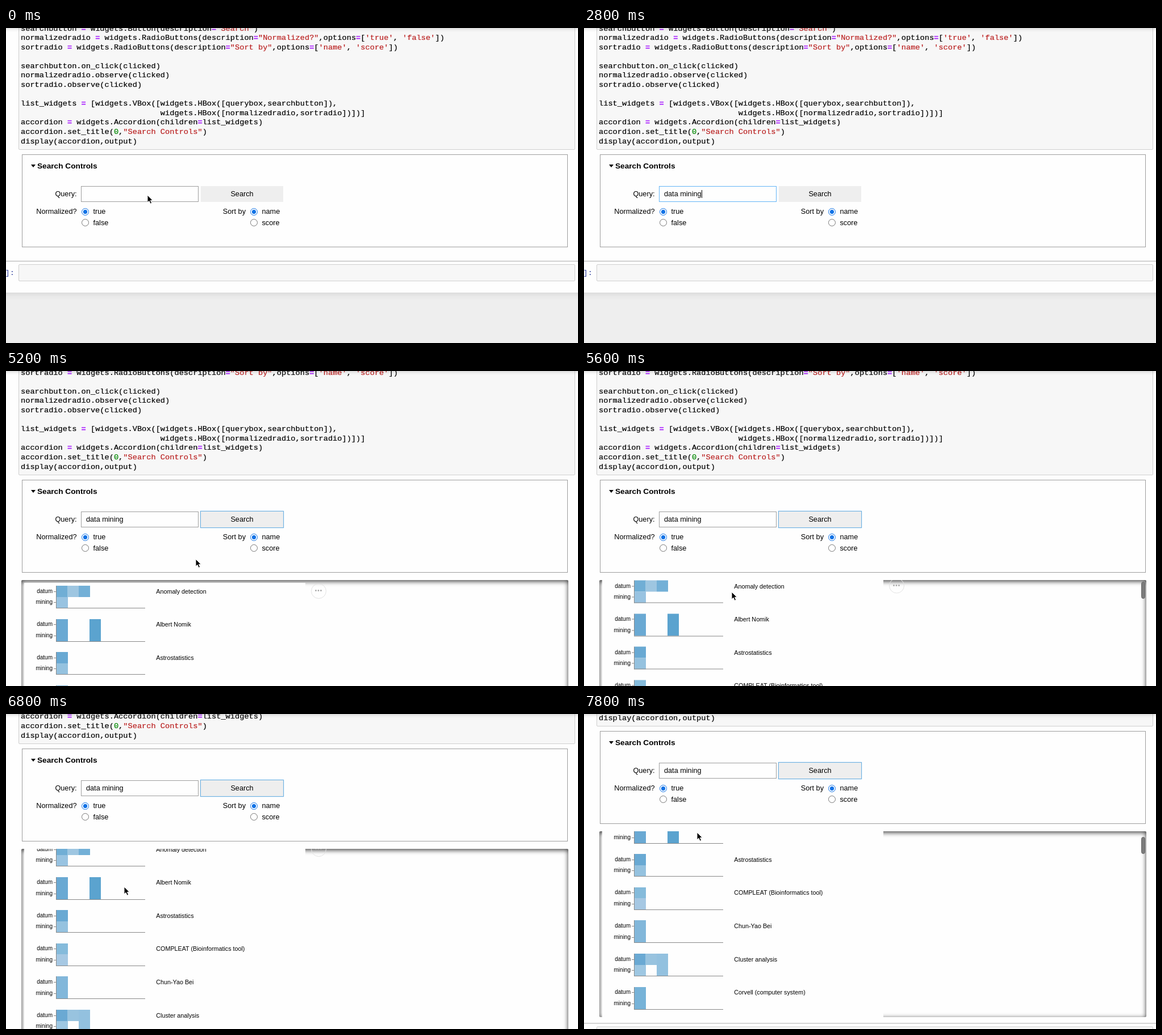
Animation, 1007 px wide and 556 px high, one loop 8 s. Source, as an HTML page:

```html
<!DOCTYPE html>
<html lang="en">
<head>
<meta charset="utf-8">
<title>Search controls</title>
<style>
  html, body { margin: 0; width: 100%; height: 100%; overflow: hidden; background: #eee; }
  body { position: relative; font: 12.7px/20px "Liberation Sans", Arial, sans-serif; color: #000; }
  div, pre, svg { position: absolute; left: 0; top: 0; box-sizing: border-box; margin: 0; white-space: pre; }
  #page, #main, #lower { width: 1007px; height: 0; }
  #paper { left: -20px; top: -20px; width: 1047px; background: #fefefe; box-shadow: 0 0 12px 1px rgba(87,87,87,.22); }
  #header { left: -20px; top: -20px; width: 1047px; height: 20px; box-shadow: 0 0 6px 1px rgba(87,87,87,.3); }
  .cell { background: #f7f7f7; border: 1px solid #cfcfcf; border-radius: 2px; }
  pre, .prompt { font: 13.67px/16.6px "Liberation Mono", "Courier New", monospace; }
  pre { left: 26px; top: -6.5px; -webkit-text-stroke: .2px; }
  pre b { color: #a2f; } pre s { color: #ba2121; text-decoration: none; } pre i { color: #080; font-style: normal; }
  .prompt { color: #303f9f; }
  .frame { border: 1px solid #9e9e9e; }
  .title { font-weight: bold; font-size: 13.67px; }
  .arrow { border: 4px solid transparent; border-top: 5px solid #000; border-bottom: 0; }
  .radio { border: 1px solid #767676; border-radius: 50%; background: #fff; }
  .radio.on { border: 1.5px solid #1273e6; background: radial-gradient(#1273e6 3.3px, #fff 4.1px); }
  #query.focus { border-color: #64b5f6; }
  #button { background: #eee; }
  #button.focus { border: 1px solid #6fb1e0; box-shadow: 0 0 1px #64b5f6; }
  #caret { background: #000; }
  #output { overflow: hidden; border-radius: 2px; box-shadow: inset 0 2px 8px rgba(0,0,0,.8); }
  #sheet { background: #fefefe; }
  #rows { width: 963px; height: 0; }
  .small { font-size: 10px; } .name { font-size: 10.75px; }
  .axis { background: #888; }
  .more { border: 1px solid #e2e2e2; border-radius: 50%; color: #aaa; text-align: center; font-size: 10px; line-height: 23px; letter-spacing: 1px; }
  #thumb { background: #7c7c7c; border: 1px solid #666; border-radius: 4px; }
</style>
</head>
<body>
<div id="page">
  <div id="paper"></div>
  <div id="main"></div>
  <div id="output"><div id="rows"></div></div>
  <div id="lower"></div>
</div>
<div id="header"></div>
<svg id="pointer" width="24" height="24" viewBox="-8 -3 24 24" stroke-linejoin="round">
  <path id="arrow" d="M0 0V13L3 10.2 5.2 15.2 7.6 14.1 5.4 9.3H9.3Z" stroke="#fff"/>
  <path id="hand" d="M-1.5 8V.5Q0-1.5 1.5.5V5Q3 3.8 4 5.4 6 4.6 6.6 6.2 9 5.4 9 8V11L7.5 15H0L-4.6 9Q-4.8 6.4-2.6 7.4ZM1.5 5V8M4 5.4V8M6.6 6.2V8" fill="#fff" stroke="#000"/>
</svg>
<script>
const $ = id => document.getElementById(id);
const [page, paper, main, output, rows, lower, pointer] =
  ["page", "paper", "main", "output", "rows", "lower", "pointer"].map($);

function box(parent, x, y, w, h, className = "", id = "") {
  const el = document.createElement("div");
  Object.assign(el.style, { left: x + "px", top: y + "px", width: w + "px", height: h + "px" });
  el.className = className;
  el.id = id;
  return parent.appendChild(el);
}

// Text centred vertically on y; align shifts it left by 0, half or all of its width.
function label(parent, text, x, y, align = 0, className = "") {
  const el = box(parent, x, y - 10, 0, 20, className);
  el.style.width = "auto";
  el.style.transform = `translateX(${-100 * align}%)`;
  el.textContent = text;
  return el;
}

const code = `searchbutton = widgets.Button(description="Search")
normalizedradio = widgets.RadioButtons(description="Normalized?",options=['true', 'false'])
sortradio = widgets.RadioButtons(description="Sort by",options=['name', 'score'])

searchbutton.on_click(clicked)
normalizedradio.observe(clicked)
sortradio.observe(clicked)

list_widgets = [widgets.VBox([widgets.HBox([querybox,searchbutton]),
                              widgets.HBox([normalizedradio,sortradio])])]
accordion = widgets.Accordion(children=list_widgets)
accordion.set_title(0,"Search Controls")
display(accordion,output)`;

box(main, 21.5, -40, 980, 254.5, "cell");
const pre = main.appendChild(document.createElement("pre"));
pre.innerHTML = code.replace(/("[^"]*"|'[^']*')|(=)|\b0\b/g,
  (m, str, op) => str ? `<s>${m}</s>` : op ? `<b>${m}</b>` : `<i>${m}</i>`);

box(main, 28, 223, 961, 164, "frame");
box(main, 44, 241, 8, 5, "arrow");
label(main, "Search Controls", 55, 243.5, 0, "title");
label(main, "Query:", 124.5, 293, 1);
const query = box(main, 132, 279, 207, 28, "frame", "query");
const typed = label(main, "", 141, 293);
const caret = box(main, 0, 286, 1, 14, "", "caret");
const button = box(main, 343, 279, 145, 28, "", "button");
label(main, "Search", 415.5, 293, .5);
label(main, "Normalized?", 124.5, 324, 1);
label(main, "Sort by", 422, 324, 1);
[[139.5, "true", "false"], [436.5, "name", "score"]].forEach(([x, ...options]) =>
  options.forEach((text, i) => {
    const y = 324 + i * 19.8;
    box(main, x - 6.5, y - 6.5, 13, 13, i ? "radio" : "radio on");
    label(main, text, x + 14, y);
  }));

// Each result: name, then shades for the datum and mining rows.
const results = [
  ["Anomaly detection", ["#70aed5", "#9ec6e1", "#73b0d7"], ["#98c3e1"]],
  ["Albert Nomik", ["#6aa9d3", , , "#5ba3cf"], ["#6aa9d3", , , "#5ba3cf"]],
  ["Astrostatistics", ["#69a9d3"], ["#95c2df"]],
  ["COMPLEAT (Bioinformatics tool)", ["#85bbdb"], ["#a6c8e3"]],
  ["Chun-Yao Bei", ["#82b7da"], ["#82b7da"]],
  ["Cluster analysis", ["#6aa9d3", "#98c3df", "#93c1df"], ["#9ec7e2", , "#93c1df"]],
  ["Corvell (computer system)", ["#77b3d8"], ["#77b3d8"]],
];
Object.assign(output.style, { left: "27px", top: "400px", width: "963px", height: "328px" });
box(rows, 5, 5, 495, 900, "", "sheet");
box(rows, 510, 6, 27, 27, "more").textContent = "•••";
results.forEach(([name, ...shades], i) => {
  const y = 10 + i * 58.6;
  shades.forEach((row, r) => {
    const middle = y + 9.6 + r * 19.6;
    // Slightly oversized so that neighbouring cells leave no seam.
    row.forEach((color, c) =>
      box(rows, 61.5 + c * 19.5, y + r * 19.6, 20, 20).style.background = color);
    label(rows, ["datum", "mining"][r], 55, middle, 1, "small");
    box(rows, 57, middle, 4, 1, "axis");
  });
  box(rows, 61, y, 1, 39.5, "axis");
  box(rows, 61, y + 39, 157, 1, "axis");
  label(rows, name, 237.3, y + 9.5, 0, "name");
});
const thumb = box(output, 954, 0, 7, 30, "", "thumb");

box(lower, 0, 411, 1007, 1, "axis").style.background = "#ababab";
box(lower, 21.5, 417, 980, 29.5, "cell");
label(lower, "]:", 15, 433, 1, "prompt").style.lineHeight = "20px";

// Linear interpolation through [time, value] stops.
function track(t, stops) {
  const i = stops.findIndex(s => s[0] > t);
  if (i < 0) return stops[stops.length - 1][1];
  if (!i) return stops[0][1];
  const [[t0, a], [t1, b]] = [stops[i - 1], stops[i]];
  return a + (b - a) * (t - t0) / (t1 - t0);
}

const words = "data mining";
const scrollStops = [[4800, 0], [5200, 31], [6200, 31], [6400, 78], [6800, 162], [7000, 185], [7200, 193]];
const innerStops = [[5400, 0], [5800, 19], [7200, 19], [7400, 38], [7600, 68], [7800, 87]];
const xStops = [[3000, 249], [3800, 407], [4600, 407], [5200, 334], [5600, 260], [5800, 260], [6200, 208], [7000, 208], [7400, 199]];
const yStops = [[3000, 295], [3800, 286], [4600, 286], [5200, 332], [5600, 390], [5800, 390], [6200, 305], [7000, 305], [7400, 209]];

function draw(t) {
  const scroll = track(t, scrollStops), inner = track(t, innerStops);
  const clicked = t >= 4200, found = t >= 4800;
  const editing = t >= 800 && !clicked;
  const shift = found ? 327.5 : clicked ? 10.5 : 0;

  page.style.transform = `translateY(${-scroll}px)`;
  lower.style.transform = `translateY(${shift}px)`;
  paper.style.height = 487 + shift + "px";

  typed.textContent = words.slice(0, track(t, [[1000, 0], [2600, words.length]]));
  query.classList.toggle("focus", editing);
  caret.hidden = !editing;
  caret.style.left = 141 + typed.offsetWidth + "px";
  button.className = clicked ? "focus" : "";
  button.style.inset = clicked ? "278px auto auto 342px" : "279px auto auto 343px";
  button.style.width = clicked ? "147px" : "145px";
  button.style.height = clicked ? "30px" : "28px";

  output.hidden = !found;
  rows.style.transform = `translateY(${-inner}px)`;
  thumb.hidden = !(t >= 5600 && t < 6200 || t >= 7400);
  thumb.style.top = 2 + inner * .09 + "px";

  const x = track(t, xStops), y = track(t, yStops);
  const onButton = x > 343 && t < 4900;
  pointer.style.transform = `translate(${x - 8}px, ${y - 3}px)`;
  pointer.style.visibility = t >= 1000 && t < 3000 ? "hidden" : "visible";
  $("arrow").style.display = onButton ? "none" : "";
  $("hand").style.display = onButton ? "" : "none";
}

function tick() {
  draw(Math.floor(performance.now() % 8000 / 200) * 200);
  requestAnimationFrame(tick);
}
tick();
</script>
</body>
</html>
```
